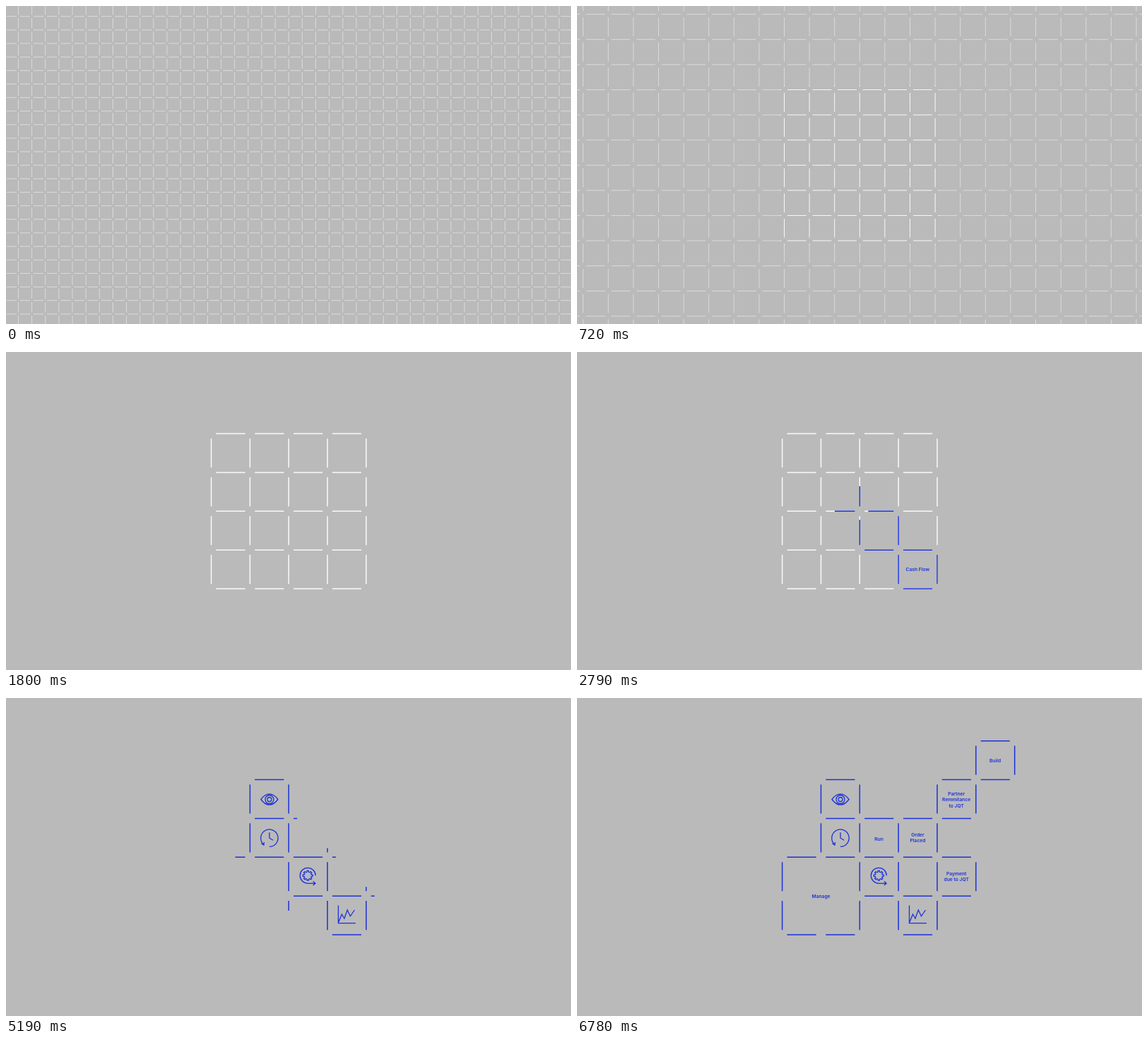
Recreate the animation shown at these times as an HTML page with a canvas. Size 800x450 px, loop 6.81 s.

```html
<!DOCTYPE html>
<html lang="en">
<head>
<meta charset="utf-8">
<title>Grid of capabilities</title>
<style>
  html, body { margin: 0; width: 100%; height: 100%; overflow: hidden; background: #bababa; }
  canvas { display: block; }
</style>
</head>
<body>
<canvas id="stage" width="800" height="450"></canvas>
<script>
const ctx = document.getElementById('stage').getContext('2d');
const LOOP = 6810, UNIT = 54.85, CX = 400.3, CY = 225.3;
const PAPER = '#bababa', WHITE = '#fafafa', BLUE = '#1c31d9';
const EDGE = 250;      // time to draw one dash
const INSET = 0.125;   // gap between a dash and its node
const MASK = 113;      // half size of the area that survives the zoom

const clamp = v => Math.min(1, Math.max(0, v));
const ease = (t, start, duration) => {
  const u = clamp((t - start) / duration);
  return u * u * (3 - 2 * u);
};
const nodeX = col => CX + (col - 2) * UNIT;
const nodeY = row => CY + (row - 2) * UNIT;

const STEP = { L: [-1, 0], R: [1, 0], U: [0, -1], D: [0, 1] };

// start time, node column, node row, moves along the grid
const paths = [
  [2060, 4, 4, 'LU'], [2060, 4, 4, 'UL'],
  [2346, 3, 3, 'LU'], [2346, 3, 3, 'UL'],
  [2632, 2, 2, 'LU'], [2632, 2, 2, 'UL'],
  [2918, 1, 1, 'U'], [2918, 2, 1, 'UL'],
  [5092, 1, 2, 'LDD'], [5092, 2, 3, 'DLL'],
  [5135, 2, 1, 'RR'], [5130, 3, 2, 'U'], [5135, 3, 2, 'RU'],
  [5130, 4, 3, 'UR'], [5135, 4, 3, 'RU'],
  [5280, 4, 1, 'UR'], [5280, 4, 1, 'RU'],
  [5560, 5, 0, 'UR'], [5560, 5, 0, 'RU']
];

// start time, centre x, centre y, lines, replaced by an icon
const labels = [
  [2510, 482.3, 307.3, ['Cash Flow'], true],
  [2796, 427.5, 252.3, ['Productivity'], true],
  [3082, 372.5, 198.7, ['Efficiency'], true],
  [3400, 372, 144.5, ['Visibility'], true],
  [5600, 427.5, 199.8, ['Run']],
  [5700, 345.5, 280.3, ['Manage']],
  [5750, 482.5, 197.6, ['Order', 'Placed']],
  [5750, 537.2, 252.8, ['Payment', 'due to JQT']],
  [5860, 537.2, 143.8, ['Partner', 'Remmitance', 'to JQT']],
  [6100, 592, 88.5, ['Build']]
];

function gearPath() {
  const teeth = 8;
  let d = '';
  for (let i = 0; i < teeth; i++) {
    [[-0.3, 5.2], [-0.2, 7], [0.2, 7], [0.3, 5.2]].forEach(([offset, r]) => {
      const a = (i + offset) * 2 * Math.PI / teeth;
      d += `${d ? 'L' : 'M'}${r * Math.cos(a)} ${r * Math.sin(a)}`;
    });
  }
  return d + 'Z';
}

const icons = [
  [373, 143.5, 'M-12 0Q-6.5-7.6 0-7.6T12 0Q6.5 7.6 0 7.6T-12 0Z' +
    'M6 0A6 6 0 1 1-6 0A6 6 0 1 1 6 0M3 0A3 3 0 1 1-3 0A3 3 0 1 1 3 0'],
  [373, 198.2, 'M-8.5 8.8A12.2 12.2 0 1 1 0 12.2M-11.5 7.5L-8 9.8L-7.6 5.8M0-8V0L5.2 3'],
  [427.3, 251.3, 'M11 0A11 11 0 1 0 0 11H10.5M7.5 8.2L10.8 11L7.5 13.8' + gearPath()],
  [482.5, 306.5, 'M-12-13V12.2H12.5M-11.5 10.5L-7-0.5L-3.5 5.5L0.8-6.5L5 2.3L11-6.5']
].map(([x, y, d]) => [x, y, new Path2D(d)]);

function drawLattice() {
  const cols = 22, rows = 13;
  ctx.beginPath();
  for (let c = -cols; c <= cols; c++) {
    ctx.moveTo(c * UNIT, -rows * UNIT);
    ctx.lineTo(c * UNIT, rows * UNIT);
  }
  for (let r = -rows; r <= rows; r++) {
    ctx.moveTo(-cols * UNIT, r * UNIT);
    ctx.lineTo(cols * UNIT, r * UNIT);
  }
  ctx.stroke();
}

function drawGrid(t) {
  const zoom = ease(t, 246, 1000);
  const scale = 0.349 + 0.651 * zoom;
  const fade = 1 - ease(t, 3740, 360);
  const layer = (alpha, outside) => {
    if (alpha <= 0) return;
    ctx.save();
    ctx.beginPath();
    if (outside) ctx.rect(0, 0, 800, 450);
    ctx.rect(CX - MASK, CY - MASK, 2 * MASK, 2 * MASK);
    ctx.clip('evenodd');
    ctx.translate(CX, CY);
    ctx.scale(scale, scale);
    ctx.globalAlpha = alpha;
    ctx.strokeStyle = WHITE;
    ctx.lineWidth = 1.5;
    ctx.setLineDash([UNIT * (1 - 2 * INSET), UNIT * 2 * INSET]);
    ctx.lineDashOffset = -UNIT * INSET;
    drawLattice();
    ctx.restore();
  };
  layer(1 - zoom, true);
  layer(fade, false);
}

function drawPaths(t) {
  ctx.lineWidth = 1.5;
  ctx.beginPath();
  for (const [start, col, row, moves] of paths) {
    let x = col, y = row;
    [...moves].forEach((move, i) => {
      const [dx, dy] = STEP[move];
      const grown = ease(t, start + i * EDGE, EDGE);
      if (grown > 0) {
        const end = INSET + grown * (1 - 2 * INSET);
        ctx.moveTo(nodeX(x + dx * INSET), nodeY(y + dy * INSET));
        ctx.lineTo(nodeX(x + dx * end), nodeY(y + dy * end));
      }
      x += dx;
      y += dy;
    });
  }
  ctx.stroke();
}

function drawLabels(t) {
  ctx.font = '600 6.7px Inter, sans-serif';
  ctx.textAlign = 'center';
  for (const [start, x, y, lines, replaced] of labels) {
    ctx.globalAlpha = ease(t, start, 250) * (replaced ? 1 - ease(t, 4150, 250) : 1);
    lines.forEach((line, i) =>
      ctx.fillText(line, x, y + 2.3 + (i - (lines.length - 1) / 2) * 8.5));
  }
}

function drawIcons(t) {
  ctx.globalAlpha = ease(t, 4400, 350);
  ctx.lineWidth = 1.3;
  for (const [x, y, path] of icons) {
    ctx.save();
    ctx.translate(x, y);
    ctx.stroke(path);
    ctx.restore();
  }
}

function draw(now) {
  const t = now % LOOP;
  ctx.globalAlpha = 1;
  ctx.fillStyle = PAPER;
  ctx.fillRect(0, 0, 800, 450);
  drawGrid(t);
  ctx.strokeStyle = ctx.fillStyle = BLUE;
  drawPaths(t);
  drawLabels(t);
  drawIcons(t);
}

let origin;
function tick(now) {
  origin ??= now;
  draw(now - origin);
  requestAnimationFrame(tick);
}
draw(0);
requestAnimationFrame(tick);
</script>
</body>
</html>
```
